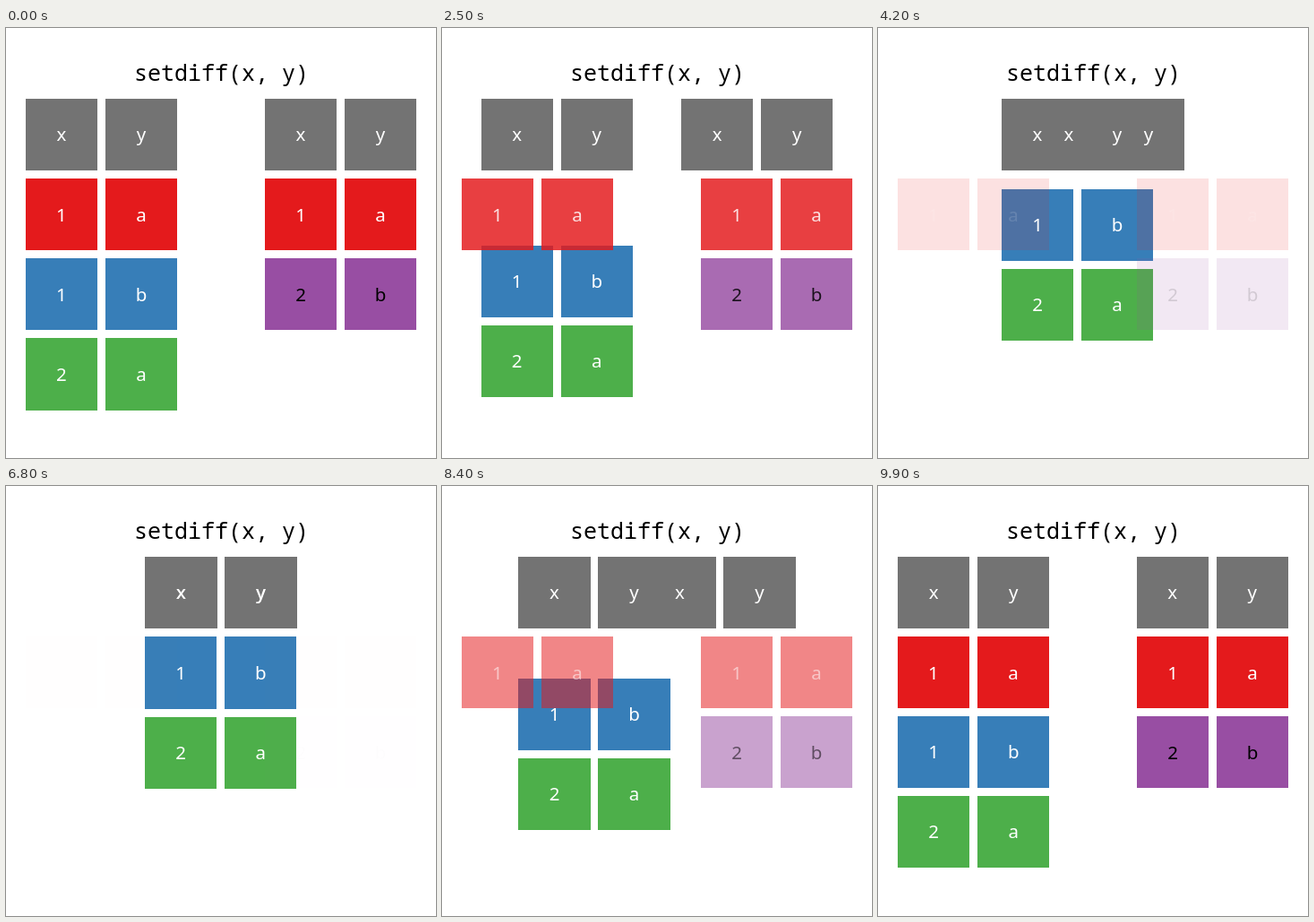
Animation of 480 by 480 pixels, one loop 10000 ms. Source, as an HTML page:

```html
<!DOCTYPE html>
<html lang="en">
<head>
<meta charset="utf-8">
<title>setdiff(x, y)</title>
<style>
  html, body { margin: 0; width: 100%; height: 100%; overflow: hidden; background: #fff; }
  svg { display: block; width: 100vw; height: 100vh; }
  text { text-anchor: middle; }
  .title { font: 25px "Fira Mono", "Noto Sans Mono", "DejaVu Sans Mono", monospace; }
  .label { font: 20.5px "Fira Sans", "Noto Sans", "Open Sans", sans-serif; }
</style>
</head>
<body>
<svg viewBox="0 0 480 480">
  <text class="title" x="240.5" y="59">setdiff(x, y)</text>
  <g id="tiles"></g>
  <g id="labels"></g>
</svg>
<script>
const LOOP = 10000, STEP = 100;
const PITCH = 480 / 5.39, SIZE = PITCH * 0.9;
const LEFT = PITCH * 0.245, TOP = 79.215;
const GREY = '#737373', RED = '#e41a1c', BLUE = '#377eb8', GREEN = '#4daf4a', PURPLE = '#984ea3';

// Each row: first column, row, colour, two labels, shift in cells (dx, dy), fades out
const rows = [
  { col: 0, row: 0, fill: GREY, text: 'xy', dx: 1.5, dy: 0 },
  { col: 3, row: 0, fill: GREY, text: 'xy', dx: -1.5, dy: 0 },
  { col: 0, row: 2, fill: BLUE, text: '1b', dx: 1.5, dy: -1 },
  { col: 0, row: 3, fill: GREEN, text: '2a', dx: 1.5, dy: -1 },
  { col: 0, row: 1, fill: RED, text: '1a', dx: 0, dy: 0, fades: true },
  { col: 3, row: 1, fill: RED, text: '1a', dx: 0, dy: 0, fades: true },
  { col: 3, row: 2, fill: PURPLE, text: '2b', dx: 0, dy: 0, fades: true, ink: '#000' }
];

function add(parent, tag, attrs) {
  const el = document.createElementNS(parent.namespaceURI, tag);
  set(el, attrs);
  return parent.appendChild(el);
}

function set(el, attrs) {
  for (const name in attrs) el.setAttribute(name, attrs[name]);
}

const tiles = document.getElementById('tiles');
const labels = document.getElementById('labels');

const cells = rows.flatMap(r => [...r.text].map((char, i) => {
  const tile = add(tiles, 'rect', { fill: r.fill });
  const label = add(labels, 'text', { class: 'label', fill: r.ink || '#fff' });
  label.textContent = char;
  return { ...r, col: r.col + i, tile, label };
}));

function ease(t, from, to) {
  const p = Math.min(1, Math.max(0, (t - from) / (to - from)));
  return (1 - Math.cos(Math.PI * p)) / 2;
}

function draw(t) {
  const k = ease(t, 1600, 5000) - ease(t, 6700, LOOP);
  for (const c of cells) {
    const x = LEFT + (c.col + c.dx * k) * PITCH;
    const y = TOP + (c.row + c.dy * k) * PITCH;
    const opacity = c.fades ? 1 - k : 1;
    // Tile edges sit on whole pixels, labels move freely
    const left = Math.round(x), top = Math.round(y);
    set(c.tile, {
      x: left, y: top, opacity,
      width: Math.round(x + SIZE) - left,
      height: Math.round(y + SIZE) - top
    });
    set(c.label, { x: x + SIZE / 2, y: y + SIZE / 2 + 7.2, opacity });
  }
}

const start = performance.now();

function tick(now) {
  const t = Math.max(0, now - start) % LOOP;
  draw(Math.floor((t + 1) / STEP) * STEP % LOOP);
  requestAnimationFrame(tick);
}

draw(0);
requestAnimationFrame(tick);
</script>
</body>
</html>
```
